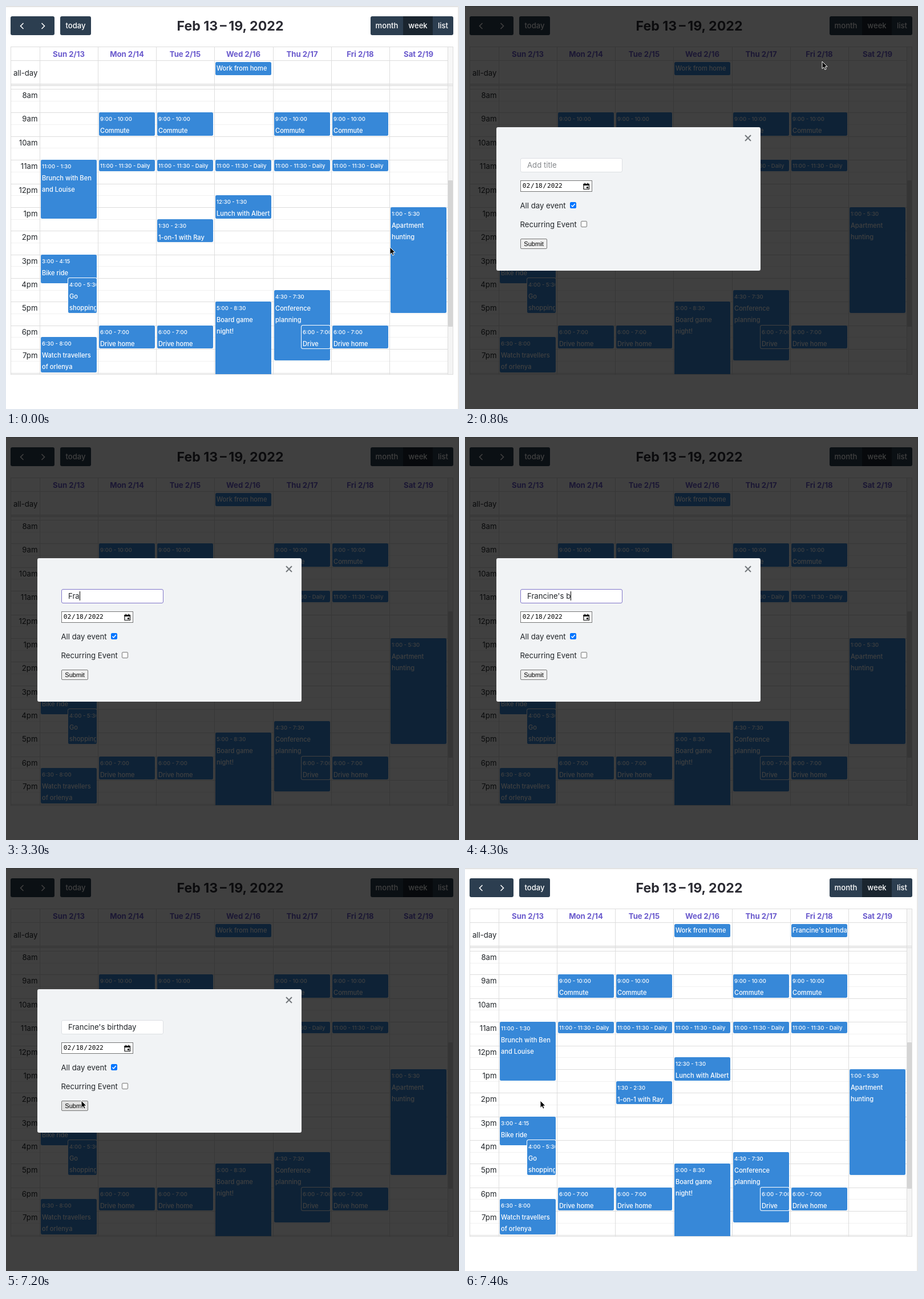
These frames come from a looping animation (794 px wide and 705 px high, 7.5 s). An HTML page:

```html
<!DOCTYPE html>
<html lang="en">
<head>
<meta charset="utf-8">
<title>Week calendar</title>
<style>
  html, body { margin: 0; width: 100%; height: 100%; overflow: hidden; background: #fff; }
  body { font: 13.2px/20px Inter, sans-serif; font-optical-sizing: none; color: #212529; }
  div, svg { position: absolute; box-sizing: border-box; }
  #stage, #page, #shade { left: 0; top: 0; width: 794px; height: 705px; overflow: hidden; }
  #page div, #events div, #modal div { white-space: pre; }
  .line { background: #ddd; }
  .minor { background: #f1f1f1; }
  .btn { background: #2c3e50; color: #fff; text-align: center; line-height: 33px; font-weight: 500; font-size: 13.1px; }
  .title { font-size: 23.2px; font-weight: 700; line-height: 32px; text-align: center; color: #2b2b33; }
  .day { color: #6a5acd; font-weight: 700; text-align: center; }
  .axis { text-align: right; }
  #events { left: 0; top: 0; width: 794px; height: 644px; overflow: hidden; }
  .event { overflow: hidden; background: #3788d8; color: #fff; border-radius: 2.5px; padding: 1px 1px 0 2px; font-weight: 500; font-size: 11.1px; }
  .event > div { position: relative; overflow: hidden; }
  .event .time { font-size: 9.5px; line-height: 21px; }
  .event .short { font-size: 9.5px; line-height: 20px; }
  .inset { box-shadow: 0 0 0 1px #fff; }
  #shade { background: rgba(0,0,0,.75); }
  #modal { left: 55px; top: 212px; width: 463px; height: 251px; border-radius: 3px; background: #f1f3f5; }
  #field { left: 42px; top: 54px; width: 179px; height: 25px; padding-left: 11px; line-height: 23px; background: #fff; border: 1px solid #dcdfe3; border-radius: 3px; }
  #field.focus { border-color: #8076c9; }
  #field.empty { color: #85888c; }
  #caret { display: inline-block; width: 1px; height: 16px; margin-right: -1px; vertical-align: -3px; background: #000; }
  .date { left: 42px; top: 93px; width: 126px; height: 20px; background: #fff; border: 1px solid #767676; color: #000;
    font: 11.1px/18px "DejaVu Sans Mono", monospace; padding-left: 2px; }
  .date span { padding: 0 .8px; }
  .check { width: 11px; height: 11px; background: #fff; border: 1px solid #767676; border-radius: 2px; }
  .check.on { background: #0075ff; border-color: #0075ff; }
  #submit { left: 42px; top: 195px; width: 47px; height: 18px; background: #efefef; border: 1px solid #767676; border-radius: 2px;
    font: 11.1px/16px "Liberation Sans", Arial, sans-serif; text-align: center; color: #000; }
  #submit.hover { background: #e1e1e1; }
  #pointer { left: 0; top: 0; width: 20px; height: 24px; overflow: visible; }
</style>
</head>
<body>
<div id="stage">
  <div id="page"></div>
  <div id="events"></div>
  <div id="shade"></div>
  <div id="modal">
    <svg style="left:435px;top:13px" width="12" height="12"><path d="M1 1L11 11M11 1L1 11" stroke="#75797d" stroke-width="2.1"/></svg>
    <div id="field"><span id="typed"></span><span id="caret"></span><span id="hint">Add title</span></div>
    <div class="date"><span>02</span>/<span>18</span>/<span>2022</span></div>
    <svg style="left:152px;top:97px" width="12" height="13"><path d="M1 2.5H10.5V11.5H1Z" fill="none" stroke="#111" stroke-width="1.2"/><path d="M.5 2H11V5H.5ZM2.5 .5H4V2H2.5ZM7.5 .5H9V2H7.5ZM6 7H9V10H6Z" fill="#111"/></svg>
    <div style="left:41.5px;top:127px">All day event</div>
    <div class="check on" style="left:128.5px;top:130.5px"></div>
    <svg style="left:128.5px;top:130.5px" width="11" height="11"><path d="M2.4 5.7L4.6 7.9L8.7 3.1" fill="none" stroke="#fff" stroke-width="1.6"/></svg>
    <div style="left:41.5px;top:160px">Recurring Event</div>
    <div class="check" style="left:147.5px;top:163.5px"></div>
    <div id="submit">Submit</div>
  </div>
  <svg id="pointer">
    <path id="arrow" d="M0 0V12.6L2.9 9.9L4.8 14.3L7.1 13.3L5.2 9.1H9.1Z" fill="#000" stroke="#fff" stroke-width="1" stroke-linejoin="round"/>
    <path id="beam" d="M-2.5 -6Q0 -6 0 -4Q0 -6 2.5 -6M0 -4.5V4.5M-2.5 6Q0 6 0 4Q0 6 2.5 6M-1.5 2H1.5" fill="none" stroke="#000" stroke-width="1.2"/>
  </svg>
</div>
<script>
const $ = id => document.getElementById(id);
const page = $('page'), events = $('events');

function box(parent, cls, x, y, w, h, html = '', style = '') {
  const el = document.createElement('div');
  el.className = cls;
  el.style.cssText = `left:${x}px;top:${y}px;width:${w}px;height:${h}px;${style}`;
  el.innerHTML = html;
  parent.append(el);
  return el;
}
const fill = (x, y, w, h, color, extra = '') => box(page, '', x, y, w, h, '', `background:${color};${extra}`);
const colX = i => Math.floor(59.2 + 102.25 * i);
const rowY = h => Math.round(145 + 41.38 * (h - 8));

// Window edges
fill(0, 0, 794, 2, '#e3e3e3');
fill(792, 0, 2, 705, '#e8e8e8');

// Toolbar
function button(x, w, text, radius = '3px', color = '#2c3e50') {
  box(page, 'btn', x, 18, w, 33, text, `border-radius:${radius};background:${color}`);
}
const chevron = d => `<svg style="left:0;top:0" width="77" height="33"><path d="${d}" fill="none" stroke="#fff" stroke-width="1.6"/></svg>`;
button(8, 77, chevron('M22.5 12L17.5 17L22.5 22M54.5 12L59.5 17L54.5 22'));
button(95, 54, 'today');
button(639, 57, 'month', '3px 0 0 3px');
button(696, 52, 'week', '0', '#1a252f');
button(748, 36, 'list', '0 3px 3px 0');
box(page, 'title', 243, 19, 300, 32, 'Feb 13\u2009–\u200919, 2022');

// Grid
fill(775, 72, 8, 64, '#f7f7f7');
fill(775, 139, 8, 505, '#f4f4f4');
const slot = fill(571, 96, 101, 40, '#ebf8fb');
for (let h = 8; h <= 20; h++) {
  box(page, 'line', 9, rowY(h), 766, 1);
  if (h < 20) {
    box(page, 'minor', 9, rowY(h + .5), 766, 1);
    box(page, 'axis', 9, rowY(h) + 1, 46.5, 20, (h + 11) % 12 + 1 + (h < 12 ? 'am' : 'pm'));
  }
}
box(page, 'axis', 9, 107, 46.5, 20, 'all-day');
fill(9, 136, 774, 4, '#f1f1f1', 'border:solid #ddd;border-width:1px 0');
box(page, 'line', 8, 95, 767, 1);
'Sun Mon Tue Wed Thu Fri Sat'.split(' ').forEach((d, i) => {
  box(page, 'line', colX(i), 71, 1, 573);
  box(page, 'day', colX(i), 74, 102, 20, `${d} 2/${13 + i}`);
});
box(page, 'line', 774, 71, 1, 573);
fill(8, 71, 776, 574, 'none', 'border:1px solid #ddd');
fill(775, 305, 8, 256, '#d5d5d5', 'border-radius:1px');

// Events
const allDay = (day, text) =>
  box(events, 'event', colX(day) + 2, 98, 98, 23, `<div>${text}</div>`);
const clock = h => `${(Math.floor(h) + 11) % 12 + 1}:${String(h % 1 * 60).padStart(2, '0')}`;
function timed(day, from, to, text, shift = 0) {
  const time = `${clock(from)} - ${clock(to)}`;
  const html = to - from < 1
    ? `<div class="short">${time} - ${text}</div>`
    : `<div class="time">${time}</div><div>${text}</div>`;
  box(events, shift ? 'event inset' : 'event', colX(day) + 2 + shift, rowY(from), 98 - shift,
    rowY(to) - rowY(from) - 1, html);
}
allDay(3, 'Work from home');
const added = allDay(5, "Francine's birthday");
for (const d of [1, 2, 4, 5]) timed(d, 9, 10, 'Commute');
for (let d = 1; d < 6; d++) timed(d, 11, 11.5, 'Daily');
for (const d of [1, 2, 5]) timed(d, 18, 19, 'Drive home');
timed(0, 11, 13.5, 'Brunch with Ben\nand Louise');
timed(0, 15, 16.25, 'Bike ride');
timed(0, 16, 17.5, 'Go\nshopping', 48);
timed(0, 18.5, 20, 'Watch travellers\nof orlenya');
timed(2, 13.5, 14.5, '1-on-1 with Ray');
timed(3, 12.5, 13.5, 'Lunch with Albert');
timed(3, 17, 20.5, 'Board game\nnight!');
timed(4, 16.5, 19.5, 'Conference\nplanning');
timed(4, 18, 19, 'Drive', 48);
timed(6, 13, 17.5, 'Apartment\nhunting');

// Timeline
const LOOP = 7500, STEP = 100;
const TEXT = "Francine's birthday";
const PAUSES = { 9: 1, 13: 1, 18: 1 };
const keyTimes = [];
for (let i = 0, t = 3100; i < TEXT.length; i++, t += STEP) {
  t += (PAUSES[i] || 0) * STEP;
  keyTimes.push(t);
}
// Each stop: time, x, y
const path = [
  [0, 673, 422], [100, 676, 382], [200, 670, 290], [300, 651, 180], [400, 633, 113], [500, 626, 97],
  [1500, 626, 97], [1600, 602, 108], [1800, 400, 214], [2000, 255, 268], [2100, 242, 271],
  [5600, 242, 271], [5700, 248, 264], [5900, 281, 238], [6100, 262, 260], [6400, 152, 364],
  [6600, 136, 400], [6800, 132, 407], [7500, 132, 407]
];
function pointerAt(t) {
  const i = Math.max(1, path.findIndex(p => p[0] >= t));
  const [t0, x0, y0] = path[i - 1], [t1, x1, y1] = path[i];
  const k = (t - t0) / (t1 - t0);
  return [x0 + (x1 - x0) * k, y0 + (y1 - y0) * k];
}
const show = (el, on) => { el.style.visibility = on ? 'visible' : 'hidden'; };

function render(t) {
  const open = t >= 800 && t < 7300;
  show($('shade'), open);
  $('modal').style.display = open ? 'block' : 'none';
  show(slot, t >= 700 && t < 800);
  show(added, t >= 7400);

  const count = keyTimes.filter(k => k <= t).length;
  const focus = t >= 2300 && t < 7100;
  const last = count ? keyTimes[count - 1] : 2300;
  $('typed').textContent = TEXT.slice(0, count);
  $('hint').style.display = count ? 'none' : 'inline';
  $('caret').style.display = focus && (t - last) % 1000 < 500 ? 'inline-block' : 'none';
  $('field').className = (focus ? 'focus' : '') + (count ? '' : ' empty');
  $('submit').className = t >= 6600 ? 'hover' : '';

  const [x, y] = pointerAt(t);
  const inField = open && x > 97 && x < 276 && y > 265 && y < 291;
  const visible = t < 3100 || t >= 5700;
  $('pointer').style.transform = `translate(${x}px,${y}px)`;
  show($('arrow'), visible && !inField);
  show($('beam'), visible && inField);
}
const start = performance.now();
function tick() {
  const t = (performance.now() - start) % LOOP;
  render(Math.floor(t / STEP) * STEP);
  requestAnimationFrame(tick);
}
tick();
</script>
</body>
</html>
```
